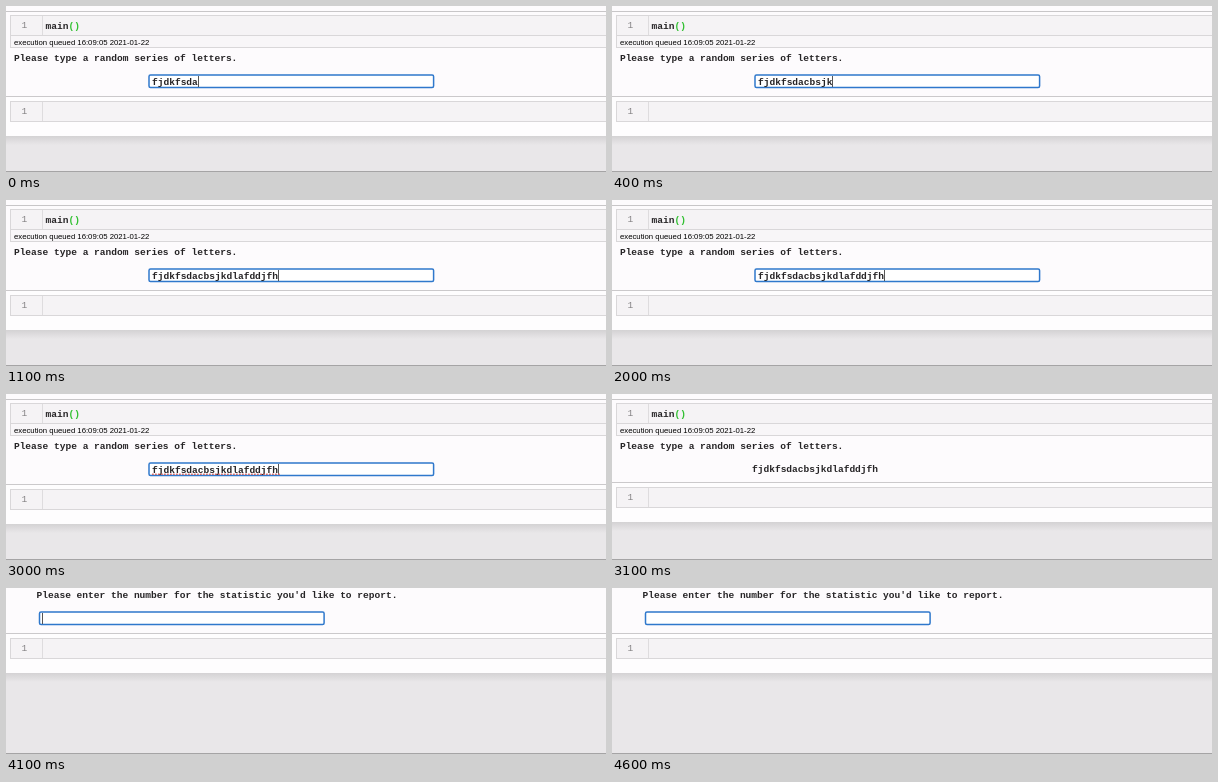
These frames come from a looping animation (600x166 px, 5000 ms). An HTML page with a canvas:

```html
<!DOCTYPE html>
<html>
<head>
<meta charset="utf-8">
<style>
html, body { margin: 0; width: 100%; height: 100%; overflow: hidden; background: #fdfbfd; }
canvas { display: block; }
</style>
</head>
<body>
<canvas id="stage" width="600" height="166"></canvas>
<script>
const ctx = document.getElementById('stage').getContext('2d');
const LOOP = 5000, CHAR = 5.74;
const MONO = '9.567px "Liberation Mono", monospace';
const BOLD = 'bold ' + MONO;
const SANS = '7.75px "Liberation Sans", sans-serif';
const LETTERS = 'fjdkfsdacbsjkdlafddjfh';
// Letters visible in each 100 ms step
const TYPED = [8, 9, 11, 12, 13, 15, 16, 18, 19, 20, 21, 22];

function rect(x, y, w, h, color) {
  ctx.fillStyle = color;
  ctx.fillRect(x, y, w, h);
}

function text(str, x, y, font = BOLD, color = '#262426') {
  ctx.font = font;
  ctx.fillStyle = color;
  ctx.fillText(str, x, y);
}

function cell(y, h) {
  rect(4, y, 596, h, '#d9d7d9');
  rect(5, y + 1, 595, h - 2, '#f5f3f5');
  rect(36, y + 1, 1, h - 2, '#dedcde');
  text('1', 15.6, y + h / 2 + 2.5, MONO, '#858385');
}

function field(x, y, str, caretOn) {
  ctx.fillStyle = '#fff';
  ctx.strokeStyle = '#2f78cc';
  ctx.lineWidth = 1.5;
  ctx.beginPath();
  ctx.roundRect(x + 1, y + 1, 284.6, 12.6, 1.5);
  ctx.fill();
  ctx.stroke();
  text(str, x + 4, y + 10.6);
  if (caretOn) rect(Math.round(x + 3.6 + str.length * CHAR), y + 2, 1, 11, '#555');
}

function squiggle(x, y, w) {
  for (let i = 0; i < w; i += 3) rect(x + i, y, 1.8, 1.3, '#d8605c');
}

// Grey page area beneath the notebook, with its soft shadow
function footer(y) {
  rect(0, y, 600, 166 - y, '#e9e7e9');
  const shade = ctx.createLinearGradient(0, y, 0, y + 9);
  shade.addColorStop(0, 'rgba(90,90,90,.15)');
  shade.addColorStop(1, 'rgba(90,90,90,0)');
  rect(0, y, 600, 9, shade);
  rect(0, 165, 600, 1, '#a5a4a5');
}

function firstScreen(t) {
  const done = t >= 3100, shift = done ? 2 : 0;
  rect(0, 5, 600, 1, '#c8c6c8');
  cell(9, 21);
  text('main', 39.5, 23);
  text('()', 39.5 + 4 * CHAR, 23, BOLD, '#30c030');
  rect(4, 30, 596, 12, '#d9d7d9');
  rect(5, 30, 595, 11, '#f8f6f8');
  text('execution queued 16:09:05 2021-01-22', 8, 38.5, SANS, '#000');
  text('Please type a random series of letters.', 7.9, 55);
  if (done) {
    text(LETTERS, 140, 78);
  } else {
    const count = TYPED[Math.min(Math.floor(t / 100), TYPED.length - 1)];
    const caretOn = t < 1500 || (t >= 2000 && t < 2500) || t >= 3000;
    field(142, 68, LETTERS.slice(0, count), caretOn);
    if (t >= 2100) squiggle(146, 79.6, LETTERS.length * CHAR);
  }
  rect(0, 90 - shift, 600, 1, '#cbc9cb');
  rect(0, 91 - shift, 600, 39, '#fefdfe');
  cell(95 - shift, 21);
  footer(130 - shift);
}

function secondScreen(t) {
  const caretOn = t < 3600 || (t >= 4100 && t < 4600);
  text("Please enter the number for the statistic you'd like to report.", 30.5, 10);
  field(32.5, 23, '', caretOn);
  rect(0, 45, 600, 1, '#cbc9cb');
  rect(0, 46, 600, 39, '#fefdfe');
  cell(50, 21);
  footer(85);
}

function draw(now) {
  const t = now % LOOP;
  rect(0, 0, 600, 166, '#fdfbfd');
  if (t < 3200) firstScreen(t);
  else secondScreen(t);
  requestAnimationFrame(draw);
}

requestAnimationFrame(draw);
</script>
</body>
</html>
```
